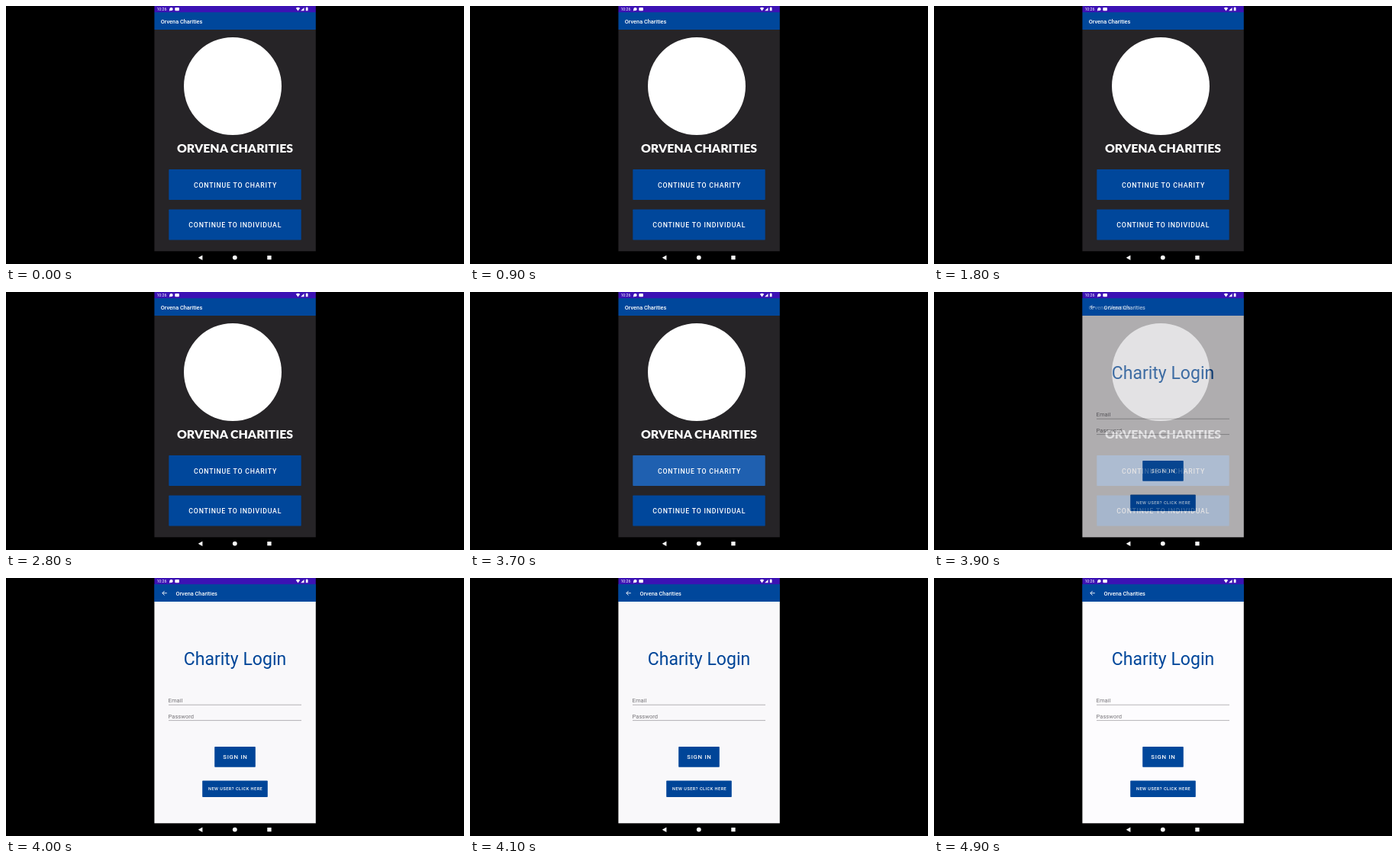
Write an HTML page that moves like this. It is 600x338 px and loops after 5000 ms.

```html
<!DOCTYPE html>
<html lang="en">
<head>
<meta charset="utf-8">
<title>Charity app</title>
<style>
  html, body { margin: 0; width: 100%; height: 100%; overflow: hidden; background: #000; }
  svg { display: block; width: 100vw; height: 100vh; font-family: Roboto, sans-serif; }
  .blue { fill: #00479b; }
  .white { fill: #fff; }
  .bar { font-size: 7.35px; font-weight: 500; }
  .label { fill: #fff; font-weight: 500; letter-spacing: .0892em; text-anchor: middle; }
  .brand { fill: #fff; font: 900 15.9px Lato, sans-serif; text-anchor: middle; }
  .hint { fill: #78767a; font-size: 7.55px; }
  .line { stroke: #a5a3a7; stroke-width: .8; }
</style>
</head>
<body>
<svg viewBox="0 0 600 338">
  <rect width="600" height="338"/>

  <g id="home">
    <rect x="194.4" y="31" width="211.4" height="290.3" fill="#262427"/>
    <circle class="white" cx="297" cy="105" r="64"/>
    <text class="brand" x="300" y="191.8">ORVENA CHARITIES</text>
    <rect id="press" class="blue" x="213.3" y="214" width="173.4" height="40" rx=".8"/>
    <text class="label" x="300.5" y="237.5" font-size="8.75">CONTINUE TO CHARITY</text>
    <rect class="blue" x="213.3" y="266.5" width="173.4" height="40" rx=".8"/>
    <text class="label" x="300.3" y="290.1" font-size="8.75">CONTINUE TO INDIVIDUAL</text>
    <rect id="dim" x="194.4" y="31" width="211.4" height="290.3" opacity="0"/>
    <rect class="blue" x="194.4" y="8" width="211.4" height="23"/>
    <text class="bar white" x="202.8" y="22.5">Orvena Charities</text>
  </g>

  <g id="login" opacity="0">
    <rect x="194.4" y="31" width="211.4" height="290.3" fill="#fdfcfe"/>
    <rect class="blue" x="194.4" y="8" width="211.4" height="23"/>
    <path d="M210.8 19.8H205M207.6 17l-2.8 2.8 2.8 2.8" fill="none" stroke="#fff" stroke-width=".9"/>
    <text class="bar white" x="222.4" y="22.5">Orvena Charities</text>
    <text class="blue" x="300" y="113.5" font-size="23" text-anchor="middle">Charity Login</text>
    <text class="hint" x="212.6" y="163.4">Email</text>
    <path class="line" d="M213 166.2H387M213 186.6H387"/>
    <text class="hint" x="212.6" y="183.6">Password</text>
    <rect class="blue" x="273.2" y="221" width="53.6" height="26.8" rx=".8"/>
    <text class="label" x="300.4" y="237.2" font-size="7.8">SIGN IN</text>
    <rect class="blue" x="257.2" y="265.6" width="85.6" height="21.4" rx=".8"/>
    <text class="label" x="300.6" y="278.4" font-size="5.55">NEW USER? CLICK HERE</text>
  </g>

  <rect x="194.4" width="211.4" height="8.2" fill="#3c12b4"/>
  <g class="white">
    <text x="197.4" y="6.2" font-size="5.2">10:26</text>
    <path d="M213.9 6.4l.4-2.6a2.2 2 0 1 1 1.6 2.1z"/>
    <rect x="221.3" y="2" width="5.6" height="4.2" rx=".9"/>
    <path d="M379.8 2.7q2.7-1.8 5.4 0L382.5 6.4zM386.2 6.3h4.3V1.9zM392.8 2h.7v-.5h1.3V2h.7v4.3h-2.7z"/>
    <path d="M257.4 326.4v6.6l-5.6-3.3z"/>
    <circle cx="299.8" cy="329.6" r="2.9"/>
    <rect x="342.3" y="327" width="5.3" height="5.3" rx=".4"/>
  </g>
</svg>
<script>
  const LOOP = 5000, STEP = 100, TAP = 3700, FADE = 3800, SETTLED = 4200;
  const el = id => document.getElementById(id);
  const press = el("press"), dim = el("dim"), login = el("login");

  function draw(now) {
    const t = Math.floor(now % LOOP / STEP) * STEP;
    const fade = Math.min(1, Math.max(0, (t - FADE) / 150));
    press.style.fill = t >= TAP ? "#1f60b0" : "";
    dim.setAttribute("opacity", fade ** 3);
    login.setAttribute("opacity", t < SETTLED ? fade * .985 : 1);
    requestAnimationFrame(draw);
  }
  requestAnimationFrame(draw);
</script>
</body>
</html>
```
